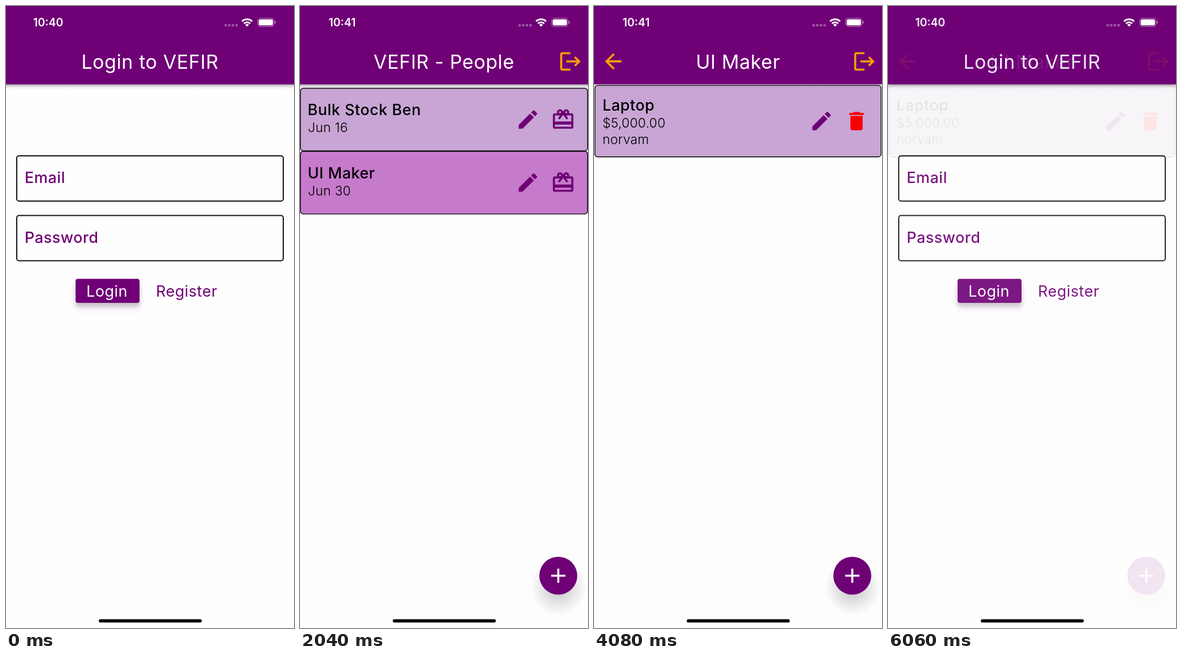
An HTML page for the animation above (6120 ms loop, 509x1100 px).

```html
<!DOCTYPE html>
<html lang="en">
<head>
<meta charset="utf-8">
<title>Gift list app</title>
<style>
  html, body { margin: 0; height: 100%; overflow: hidden; background: #fdfdfd; }
  svg { display: block; width: 100vw; height: 100vh; }
  text { font: 400 27px Inter, Roboto, sans-serif; letter-spacing: .5px; white-space: pre; }
  .title { font-size: 34px; letter-spacing: .6px; fill: #fff; text-anchor: middle; }
  .clock { font-size: 19.5px; font-weight: 600; letter-spacing: 0; fill: #fff; text-anchor: middle; }
  .name { font-weight: 500; }
  .detail { font-size: 23px; font-weight: 300; letter-spacing: .2px; }
  .button { filter: drop-shadow(0 6px 3px #0002) drop-shadow(0 8px 6px #60106028); }
</style>
</head>
<body>
<svg id="stage" viewBox="0 0 509 1100"></svg>
<script>
const PURPLE = '#6f0076', ORANGE = '#ff9e00', LILAC = '#c8a5d4', ORCHID = '#c67acb';
const LOOP = 6120, STEP = 60, STEPS = 10;

const icons = {
  edit: '<path d="M3 17.25V21h3.75L17.81 9.94l-3.75-3.75zM20.71 7.04c.39-.39.39-1.02 0-1.41l-2.34-2.34c-.39-.39-1.02-.39-1.41 0l-1.83 1.83 3.75 3.75z"/>',
  trash: '<path d="M6 19c0 1.1.9 2 2 2h8c1.1 0 2-.9 2-2V7H6zM19 4h-3.5l-1-1h-5l-1 1H5v2h14z"/>',
  logout: '<path d="M17 7l-1.41 1.41L18.17 11H8v2h10.17l-2.58 2.58L17 17l5-5zM4 5h8V3H4c-1.1 0-2 .9-2 2v14c0 1.1.9 2 2 2h8v-2H4z"/>',
  back: '<path d="M20 11H7.83l5.59-5.59L12 4l-8 8 8 8 1.41-1.41L7.83 13H20z"/>',
  gift: `<g fill="none" stroke="${PURPLE}" stroke-width="2"><rect x="3" y="7" width="18" height="13" rx="1"/>
    <circle cx="9" cy="5" r="2"/><circle cx="15" cy="5" r="2"/><path d="M7.8 11.4L12 5.7l4.2 5.7"/>
    <path d="M3 15.5h18" stroke-width="3"/></g>`
};

const icon = (name, x, y, color) =>
  `<g transform="translate(${x} ${y}) scale(1.81)" fill="${color}">${icons[name]}</g>`;
const text = (s, x, y, cls = '', fill = '#000') =>
  `<text x="${x}" y="${y}" class="${cls}" fill="${fill}">${s}</text>`;
const box = (x, y, w, h, r, style) =>
  `<rect x="${x}" y="${y}" width="${w}" height="${h}" rx="${r}" ${style}/>`;
const card = (x, y, h, fill) =>
  box(x, y, 509 - 2 * x, h, 5, `fill="${fill}" stroke="#000" stroke-width="1.35"`);
const field = (label, y) =>
  box(19, y, 471, 80, 4, 'fill="none" stroke="#111" stroke-width="2"') +
  text(label, 33, y + 48, 'name', PURPLE);

const status = clock => text(clock, 74.5, 36, 'clock') +
  [386, 392.4, 398.8, 405.2].map(x => box(x, 31.8, 4.4, 4.4, 1.5, 'fill="#fff" opacity=".33"')).join('') +
  `<g fill="none" stroke="#fff" stroke-width="3">
    <path d="M417.2 27.2a12.6 12.6 0 0 1 17.8 0M420.6 31a8 8 0 0 1 11 0"/></g>
   <path d="M422.8 33.3a5 5 0 0 1 6.6 0l-3.3 3.2z" fill="#fff"/>` +
  box(444.7, 21.5, 29, 14.6, 4.5, 'fill="none" stroke="#fff" stroke-opacity=".45" stroke-width="1.2"') +
  box(446.6, 23.4, 25.2, 10.8, 2.8, 'fill="#fff"') +
  box(475, 26.5, 1.7, 4.8, .8, 'fill="#fff" opacity=".5"');

const header = (title, clock, shade = 1) =>
  `<rect y="138" width="509" height="9" fill="url(#shade)" opacity="${shade}"/>
   <rect width="509" height="138.5" fill="${PURPLE}"/>` +
  status(clock) + text(title, 254.5, 110.5, 'title');
const logout = icon('logout', 456.2, 76.3, ORANGE);
const fab = `<circle cx="457" cy="1028" r="48" fill="url(#glow)"/>
  <circle cx="456.5" cy="1007.5" r="33.5" fill="${PURPLE}"/>
  <path d="M444 1007.5h25M456.5 995v25" stroke="#fff" stroke-width="3.6"/>`;
const screen = (bg, body) =>
  `<g class="screen"><rect width="509" height="1100" fill="${bg}"/>${body}</g>`;

const person = (name, date, y, fill) => card(.7, y, 110.8, fill) +
  text(name, 13.5, y + 47.5, 'name') + text(date, 14, y + 77.5, 'detail') +
  icon('edit', 381.1, y + 33.5, PURPLE) + icon('gift', 443.3, y + 33.5, PURPLE);

const login = screen('#fefefe',
  header('Login to VEFIR', '10:40') + field('Email', 265) + field('Password', 370.5) +
  box(123, 482.5, 113, 42.5, 4, `class="button" fill="${PURPLE}"`) +
  text('Login', 142, 514, '', '#fff') + text('Register', 265, 514, '', PURPLE));

const people = screen('#fdfdfd',
  header('VEFIR - People', '10:41') + logout +
  person('Bulk Stock Ben', 'Jun 16', 145.5, LILAC) +
  person('UI Maker', 'Jun 30', 257, ORCHID) + fab);

const gifts = screen('#fdfdfd',
  card(1.6, 140.3, 126.4, LILAC) + header('UI Maker', '10:41', .35) +
  icon('back', 12.3, 76.2, ORANGE) + logout +
  text('Laptop', 15, 185, 'name') + text('$5,000.00', 15, 215, 'detail') +
  text('norvam', 15, 244, 'detail') +
  icon('edit', 380.4, 181.8, PURPLE) + icon('trash', 442.2, 181.8, '#f80000') + fab);

const stage = document.getElementById('stage');
stage.innerHTML = `<defs><linearGradient id="shade" x2="0" y2="1">
    <stop stop-color="#302038" stop-opacity=".45"/>
    <stop offset=".45" stop-color="#302038" stop-opacity=".14"/>
    <stop offset="1" stop-color="#302038" stop-opacity="0"/></linearGradient>
  <radialGradient id="glow">
    <stop offset=".3" stop-color="#101010" stop-opacity=".18"/>
    <stop offset=".72" stop-color="#402048" stop-opacity=".08"/>
    <stop offset="1" stop-color="#602068" stop-opacity=".01"/></radialGradient></defs>` +
  login + people + gifts + login + box(164, 1084.6, 182, 5.6, 2.8, 'fill="#000"');

// Each later screen fades in, in even steps, over the one beneath it.
const layers = [...stage.querySelectorAll('.screen')].slice(1);
const starts = [1500, 3540, 5580];
const begin = performance.now();

function draw() {
  const t = Math.max(0, performance.now() - begin) % LOOP;
  layers.forEach((layer, i) => {
    const step = Math.floor((t - starts[i]) / STEP) + 1;
    layer.setAttribute('opacity', Math.min(Math.max(step / STEPS, 0), 1));
  });
  requestAnimationFrame(draw);
}
draw();
</script>
</body>
</html>
```
